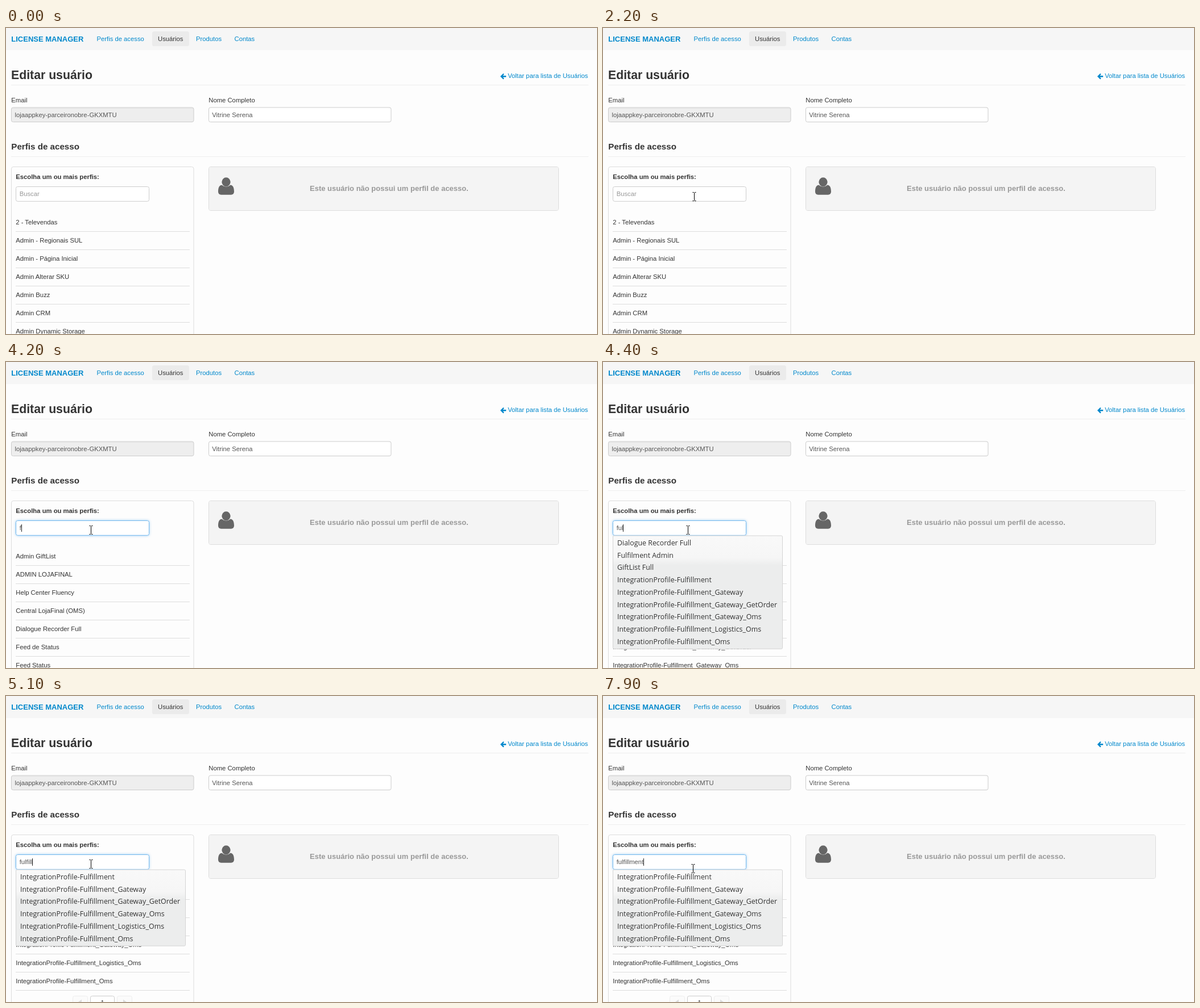
An HTML page for the animation above (8 s loop, 1039x539 px).

```html
<!DOCTYPE html>
<html lang="pt">
<head>
<meta charset="utf-8">
<style>
  html, body { margin: 0; width: 100%; height: 100%; overflow: hidden; background: #fdfdfd; }
  svg { display: block; }
  text { font: 11.27px "Liberation Sans", Arial, sans-serif; fill: #333; white-space: pre; }
  .bold { font-weight: bold; }
  .link { fill: #08c; }
  .link.hover { fill: #005580; text-decoration: underline; }
  .brand { font-size: 13px; }
  .title { font-size: 21.25px; }
  .section { font-size: 15.17px; }
  .empty { font-size: 13px; fill: #999; }
  .value { fill: #555; }
  .hint { fill: #999; }
  .option { font: 12.4px "Open Sans", sans-serif; }
  .field { fill: #fff; stroke: #ccc; }
  .rule { fill: #eee; }
  .focus { filter: drop-shadow(0 0 2px rgba(82, 168, 236, .6)); }
</style>
</head>
<body>
<svg width="1039" height="539" viewBox="0 0 1039 539">
  <defs>
    <linearGradient id="menu" gradientUnits="userSpaceOnUse" x1="0" y1="306" x2="0" y2="358">
      <stop offset="0" stop-color="#f9f9f9"/>
      <stop offset=".75" stop-color="#f6f6f6"/>
      <stop offset="1" stop-color="#eceded"/>
    </linearGradient>
  </defs>

  <rect width="1039" height="39" fill="#f6f6f6"/>
  <rect x="257" y="6" width="65" height="26" rx="3.5" fill="#ebebeb"/>
  <text class="link bold brand" x="9.3" y="24">LICENSE MANAGER</text>
  <text class="link" x="159.5" y="22.7">Perfis de acesso</text>
  <text x="267" y="22.7">Usuários</text>
  <text class="link" x="334" y="22.7">Produtos</text>
  <text class="link" x="401.5" y="22.7">Contas</text>

  <text class="bold title" x="9" y="89.5">Editar usuário</text>
  <path id="back" class="link" d="M869 85.2l5.2-5.2 1.6 1.6-2.3 2.3h5.7v2.6h-5.7l2.3 2.3-1.6 1.6z"/>
  <text id="backText" class="link" x="882.2" y="88">Voltar para lista de Usuários</text>
  <rect class="rule" x="9" y="100" width="1015" height="1"/>

  <text x="9.3" y="130.6">Email</text>
  <rect class="field" style="fill:#eee" x="9.5" y="140" width="320.5" height="25.5" rx="3"/>
  <path d="M11 141.2H329" stroke="#e2e2e2"/>
  <text class="value" x="15.5" y="156.6">lojaappkey-parceironobre-GKXMTU</text>
  <text x="356.3" y="130.6">Nome Completo</text>
  <rect class="field" x="356.5" y="140" width="320.5" height="25.5" rx="3"/>
  <text class="value" x="362.3" y="156.6">Vitrine Serena</text>

  <text class="bold section" x="9.3" y="214.3">Perfis de acesso</text>
  <rect class="rule" x="9" y="226" width="1015" height="1"/>

  <rect class="field" style="stroke:#ddd" x="356.5" y="244.5" width="615" height="77" rx="3.5" fill="#f4f4f4"/>
  <rect x="357" y="245" width="614" height="76" rx="3" fill="#f4f4f4"/>
  <g fill="#666">
    <ellipse cx="387" cy="271.3" rx="7.6" ry="8"/>
    <path d="M379.5 276.5c-4.500 0-6.500 5-6.500 11.500 0 3.500 2 5.700 5.300 5.700h17.400c3.300 0 5.300-2.200 5.300-5.700 0-6.500-2-11.500-6.500-11.500-2 2-4.500 3-7.500 3s-5.500-1-7.500-3z"/>
  </g>
  <text class="bold empty" x="534" y="287.4">Este usuário não possui um perfil de acesso.</text>

  <rect x="9.500" y="244.5" width="320.5" height="400" rx="3.5" fill="none" stroke="#ddd"/>
  <text class="bold" x="17.3" y="265.7">Escolha um ou mais perfis:</text>
  <rect id="search" class="field" x="17.5" y="279.5" width="234" height="25.8" rx="3"/>
  <text id="query" x="23.7" y="296.3"></text>
  <g id="list"></g>
  <rect id="caret" y="286" width="1" height="13" fill="#222"/>
  <path id="pointer" stroke-linejoin="round"/>
</svg>

<script>
const LOOP = 8000;
const byId = id => document.getElementById(id);
const [back, backText, search, query, list, caret, pointer] =
  ['back', 'backText', 'search', 'query', 'list', 'caret', 'pointer'].map(byId);

const base = 'IntegrationProfile-Fulfillment';
const profiles = [
  '2 - Televendas', 'Admin - Regionais SUL', 'Admin - Página Inicial', 'Admin Alterar SKU',
  'Admin Buzz', 'Admin CRM', 'Admin Dynamic Storage', 'Admin GiftList', 'ADMIN LOJAFINAL',
  'Help Center Fluency', 'Central LojaFinal (OMS)', 'Dialogue Recorder Full', 'Feed de Status',
  'Feed Status', 'Fulfilment Admin', 'GiftList Full',
  ...['', '_Gateway', '_Gateway_GetOrder', '_Gateway_Oms', '_Logistics_Oms', '_Oms'].map(s => base + s)
];

const word = 'fulfillment';
const keyTimes = [4200, 4300, 4400, 4600, 4700, 4800, 5100, 5300, 5400, 5500, 5600];
const caretFlips = [3300, 3800, 4200, 6200, 6600, 7100, 7500];

const shapes = {
  arrow: 'M.5.5V16.500l3.700-3.500 2.600 5.500 2.300-1-2.500-5.400H11.500z',
  hand: 'M5.500 12V2c0-2 3-2 3 0v6c0-1.500 3-1.500 3 .3 0-1.300 2.700-1.300 2.700.5 0-1 2.300-1 2.300.8V14c0 3-1.500 3-1.500 6H7c0-3-3-5-5.500-8-1-2 1-3 2-2z',
  beam: 'M-3-7.500H-1L0-6.500 1-7.500H3M0-6.500V6.500M-3 7.500H-1L0 6.500 1 7.500H3'
};

// time, x, y, and the shape when it changes
const path = [
  [200, 965, 65, 'hand'], [300, 860, 105, 'arrow'], [400, 767, 149], [500, 763, 149],
  [800, 727, 153], [900, 583, 183], [1000, 455, 193], [1100, 449, 192],
  [1400, 386, 212], [1500, 276, 246], [1600, 214, 267],
  [1900, 190, 290, 'beam'], [2000, 174, 294], [2100, 165, 296], [2200, 160.5, 297],
  [2300, 152, 298], [2400, 145, 298], [2500, 141, 297], [2600, 149.5, 296],
  [7500, 150, 296], [7600, 152, 298], [7700, 155, 301], [7800, 158, 303], [7900, 158.5, 304]
];

const label = (text, x, y, type = '') => `<text class="${type}" x="${x}" y="${y}">${text}</text>`;
const box = (x, y, w, h, style) => `<rect x="${x}" y="${y}" width="${w}" height="${h}" ${style}/>`;

function pager(y) {
  const side = 'rx="3" fill="#fbfbfb" stroke="#eee"';
  return box(117.5, y, 26, 26, side) + box(195.5, y, 26, 26, side) +
    box(148.5, y, 42, 26, 'rx="3" fill="#fff" stroke="#ccc"') +
    `<path d="M133 ${y + 6}v9l-6-4.500zM206 ${y + 6}v9l6-4.500z" fill="#ddd"/>` +
    label(1, 166.5, y + 15);
}

function menu(found) {
  const pitch = 21.7;
  return box(17.5, 306, 298, found.length * pitch + 4, 'rx="2" fill="url(#menu)" stroke="#d4d4d4"') +
    found.map((name, i) => label(name, 25, (323 + i * pitch).toFixed(1), 'option')).join('');
}

let shown = null;
function showList(text) {
  if (text === shown) return;
  shown = text;
  const found = profiles.filter(name => name.toLowerCase().includes(text));
  const rows = found.slice(0, 7).map((name, i) =>
    label(name, 17.3, 345.6 + 32 * i) + box(17, 358 + 32 * i, 306, 1, 'fill="#ddd"'));
  list.innerHTML = rows.join('') +
    (found.length < 7 ? pager(336.5 + 32 * found.length) : '') +
    (text.length > 1 ? menu(found) : '');
  query.textContent = text || 'Buscar';
  query.setAttribute('class', text ? 'value' : 'hint');
}

function showPointer(t) {
  const passed = path.filter(p => p[0] <= t);
  pointer.style.display = passed.length ? '' : 'none';
  if (!passed.length) return;
  const [, x, y] = passed.at(-1);
  const shape = passed.findLast(p => p[3])[3];
  pointer.setAttribute('d', shapes[shape]);
  pointer.setAttribute('fill', shape === 'beam' ? 'none' : '#fff');
  pointer.setAttribute('stroke', shape === 'beam' ? '#000' : '#111');
  pointer.setAttribute('transform', `translate(${x} ${y})`);
}

function draw(now) {
  const t = Math.floor(now % LOOP / 100) * 100;
  const text = word.slice(0, keyTimes.filter(k => k <= t).length);
  showList(text);
  showPointer(t);

  const hover = t === 200;
  back.classList.toggle('hover', hover);
  backText.classList.toggle('hover', hover);

  search.style.stroke = t < 3200 ? '' : t < 3300 ? '#a5c8e2' : '#75b9ee';
  search.classList.toggle('focus', t >= 3200);

  const lit = caretFlips.filter(f => f <= t).length % 2;
  caret.style.display = lit ? '' : 'none';
  caret.setAttribute('x', Math.round(23.5 + (text ? query.getComputedTextLength() : -.5)));
  requestAnimationFrame(draw);
}
requestAnimationFrame(draw);
</script>
</body>
</html>
```
